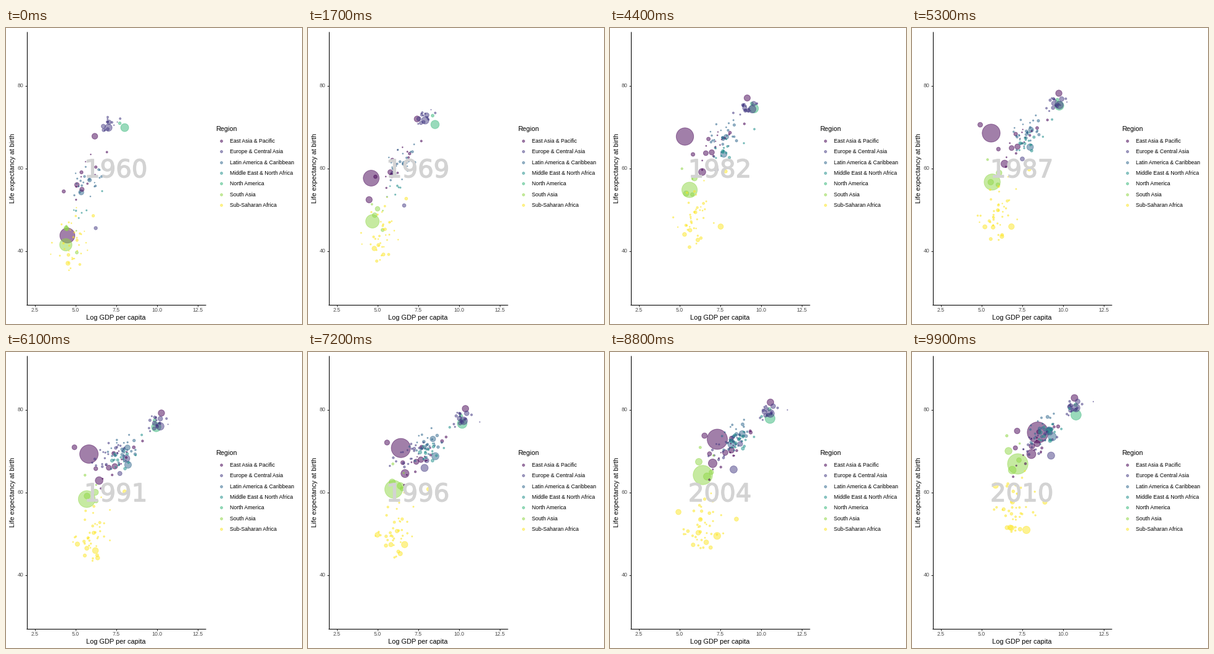
A matplotlib script that plays this animation: 480 by 480 pixels, repeating every 10000 ms.

```python
import numpy as np
import matplotlib
import matplotlib.pyplot as plt
from matplotlib.animation import FuncAnimation
from matplotlib.colors import to_rgba
from matplotlib.patheffects import withStroke

matplotlib.rcParams["font.family"] = "Liberation Sans"

SIZE, DPI, FRAMES = 480, 72, 100
FIRST_YEAR, YEARS = 1960, 50
REGIONS = ["East Asia & Pacific", "Europe & Central Asia",
           "Latin America & Caribbean", "Middle East & North Africa",
           "North America", "South Asia", "Sub-Saharan Africa"]
COLORS = ["#440154", "#443A83", "#31688E", "#21908C",
          "#35B779", "#8FD744", "#FDE725"]
EAP, ECA, LAC, MENA, NAM, SAS, SSA = range(7)
GROWTH = [1.8, 1.2, 2.4, 3, 1.7, 2.8, 3.5]  # population factor over the loop

steps = np.arange(FRAMES)
year_steps = np.linspace(0, FRAMES - 1, YEARS + 1)
rng = np.random.default_rng(11)
bubbles_data = []  # (region, x, y, radius, first frame)


def bubble(region, pop, path, offset=(0, 0), drift=(0, 0), wobble=0, start=None,
           growth=None):
    """One country: moves through (frame, x, y) points; population in millions."""
    keys = np.array(path, float)
    track = []
    for axis in (0, 1):
        points = keys[:, axis + 1] + offset[axis]
        points = points + drift[axis] * rng.normal(size=len(keys))
        yearly = wobble * (1 - 0.6 * axis) * rng.normal(size=YEARS + 1)
        track.append(np.interp(steps, keys[:, 0], points)
                     + np.interp(steps, year_steps, yearly))
    people = pop * (growth or GROWTH[region]) ** (steps / (FRAMES - 1))
    radius = 0.3 + 0.46 * np.sqrt(people)
    bubbles_data.append((region, *track, radius, keys[0, 0] if start is None else start))


def group(region, count, pop, path, spread, slope, scatter, late=0.0):
    """Countries spread along a sloped band whose centre follows the path."""
    for _ in range(count):
        u, v = np.clip(rng.normal(size=2), -1.8, 1.8)
        offset = spread * u, slope * spread * u + scatter * v
        size = pop * np.exp(np.clip(rng.normal(0, 0.8), -1.5, 1.2))
        start = rng.integers(1, 55) if rng.random() < late else None
        bubble(region, size, path, offset, (0.25 * spread, 0.25 * scatter), 1, start)


# The largest countries, by a few turning points
bubble(EAP, 667, [(0, 99, 336), (4, 93, 332), (17, 102, 243), (44, 121, 175.5),
                  (61, 134, 165), (88, 173.5, 141), (99, 203.5, 130)], growth=2)
bubble(EAP, 93, [(0, 143.5, 175), (17, 176.5, 147), (44, 222, 113),
                 (61, 251.5, 98.5), (99, 263, 74)], growth=1.4)
bubble(EAP, 95, [(14, 93, 283), (44, 149, 233), (61, 150.5, 208),
                 (88, 166, 180), (99, 193, 165)], growth=2.5)
bubble(EAP, 40, [(51, 110, 157), (61, 110.5, 154), (99, 170, 127.5)], growth=2.2)
bubble(ECA, 148, [(58, 196, 168), (72, 188.5, 187.5), (88, 200, 190),
                  (99, 225, 167.5)], growth=1)
bubble(ECA, 27, [(0, 145, 324), (44, 172, 229), (72, 192, 175.5),
                 (99, 223.5, 130)], growth=2.6)
bubble(ECA, 0.4, [(0, 180, 152), (17, 199, 132), (72, 278, 113), (99, 293.5, 80)])
bubble(LAC, 72, [(0, 121.5, 266), (17, 138, 236), (44, 184, 204),
                 (72, 206, 168.5), (88, 197, 149), (99, 227, 137)], growth=2.7)
bubble(LAC, 38, [(0, 135, 246), (44, 188, 176), (72, 202, 140.5),
                 (99, 222, 126)], growth=3)
bubble(NAM, 181, [(0, 192, 161), (17, 205.5, 156), (44, 233, 130), (99, 265.5, 101.5)])
bubble(NAM, 18, [(0, 184, 154), (44, 229.5, 122), (99, 265, 85)])
bubble(SAS, 449, [(0, 96.5, 351), (17, 104, 313), (44, 128.5, 262),
                  (61, 130.5, 238), (88, 150, 199), (99, 171, 181)])
bubble(SAS, 50, [(0, 98, 325), (44, 123, 268), (88, 143.5, 177.5), (99, 156, 160)])
bubble(SAS, 46, [(0, 97, 324), (44, 136.5, 243), (99, 162, 191)], growth=3.7)
bubble(SSA, 45, [(0, 100, 381), (17, 107, 357), (44, 179, 321.5),
                 (61, 144.5, 321.5), (99, 185, 288)])
bubble(SSA, 22, [(42, 121, 337), (72, 112, 296), (88, 110.5, 259),
                 (99, 135, 216)], growth=4)
bubble(SSA, 17, [(0, 141, 304), (44, 187, 232), (72, 195, 222),
                 (88, 204.5, 270.5), (99, 215, 243)], growth=2.9)

# Everyone else
group(EAP, 5, 20, [(0, 122, 245), (44, 165, 190), (99, 205, 140)], 18, -0.9, 8)
group(EAP, 13, 2, [(0, 132, 235), (44, 175, 190), (99, 192, 160)], 22, -0.8, 14, 0.6)
group(ECA, 5, 45, [(0, 162, 158), (44, 222, 128), (61, 243, 116), (99, 259, 87)],
      6, -0.4, 4)
group(ECA, 14, 4, [(0, 168, 151), (44, 217, 128), (61, 242, 113), (99, 259, 88)],
      9, -0.4, 6, 0.2)
group(ECA, 20, 5, [(58, 172, 161), (72, 170, 162), (99, 212, 139)], 18, -0.6, 8)
group(LAC, 28, 3, [(0, 134, 245), (44, 184, 177), (72, 192, 152), (99, 214, 126)],
      17, -0.7, 12, 0.3)
group(MENA, 16, 4, [(0, 124, 300), (44, 190, 198), (61, 190, 174), (99, 221, 131)],
      19, -0.6, 12, 0.5)
group(SAS, 3, 8, [(0, 98, 340), (44, 122, 255), (99, 160, 165)], 12, -0.8, 20)
group(SSA, 13, 6, [(0, 103, 350), (44, 130, 313), (72, 133, 295), (88, 140, 285),
                   (99, 155, 255)], 12, -0.4, 23, 0.15)
group(SSA, 27, 2, [(0, 106, 345), (44, 138, 297), (72, 143, 283), (88, 149, 280),
                   (99, 168, 248)], 16, -0.5, 24, 0.3)

region, X, Y, R, start = (np.array(part) for part in zip(*bubbles_data))
rgba = np.array([to_rgba(c, 0.5) for c in COLORS])

# Canvas in pixels, with whole numbers at pixel centres
fig = plt.figure(figsize=(SIZE / DPI, SIZE / DPI), dpi=DPI, facecolor="white")
ax = fig.add_axes([0, 0, 1, 1])
ax.set(xlim=(-0.5, SIZE - 0.5), ylim=(SIZE - 0.5, -0.5))
ax.axis("off")


def line(xs, ys, color="black"):
    ax.plot(xs, ys, color=color, lw=1.07, solid_capstyle="butt")


def label(x, y, s, size, color="black", ha="left", va="baseline", **kw):
    return ax.text(x, y, s, fontsize=size, color=color, ha=ha, va=va, **kw)


for i in range(5):
    x = 46 + 66 * i
    line([x, x], [448, 451], "#333333")
    label(x, 460, f"{2.5 * (i + 1):.1f}", 8.7, "#4D4D4D", "center")
for v in (40, 60, 80):
    y = 227 - 6.7 * (v - 60)
    line([30, 33], [y, y], "#333333")
    label(28, y + 3, str(v), 8.7, "#4D4D4D", "right")
line([33, 33], [5.5, 448.4])
line([32.6, 323.5], [448, 448])
label(178, 472.5, "Log GDP per capita", 11, ha="center")
label(15.9, 227, "Life expectancy at birth", 10.9, ha="right", va="center", rotation=90)

label(339.5, 166.5, "Region", 10.8)
for i, name in enumerate(REGIONS):
    y = 182.6 + 17.3 * i
    ax.scatter([348.6], [y], s=15, color=[rgba[i]], linewidths=0.9)
    label(362.7, y + 3, name, 8.7)

bubbles = ax.scatter([], [], linewidths=0.9, zorder=3)
GREY = "#D3D3D3"
year = label(177.5, 241.7, str(FIRST_YEAR), 40.3, GREY, "center",
             family="DejaVu Sans", zorder=4,
             path_effects=[withStroke(linewidth=1.3, foreground=GREY)])

HELD = (18, 26)  # steps that repeat the one before


def draw(frame):
    f = frame - (frame in HELD)
    on = start <= f
    bubbles.set_offsets(np.column_stack([X[on, f], Y[on, f]]))
    bubbles.set_sizes((2 * R[on, f]) ** 2)
    bubbles.set_facecolor(rgba[region[on]])
    bubbles.set_edgecolor(rgba[region[on]])
    year.set_text(str(FIRST_YEAR + round(YEARS * f / (FRAMES - 1))))
    return bubbles, year


anim = FuncAnimation(fig, draw, frames=FRAMES, interval=100, repeat=True,
                     repeat_delay=0, blit=False)
plt.show()
```
